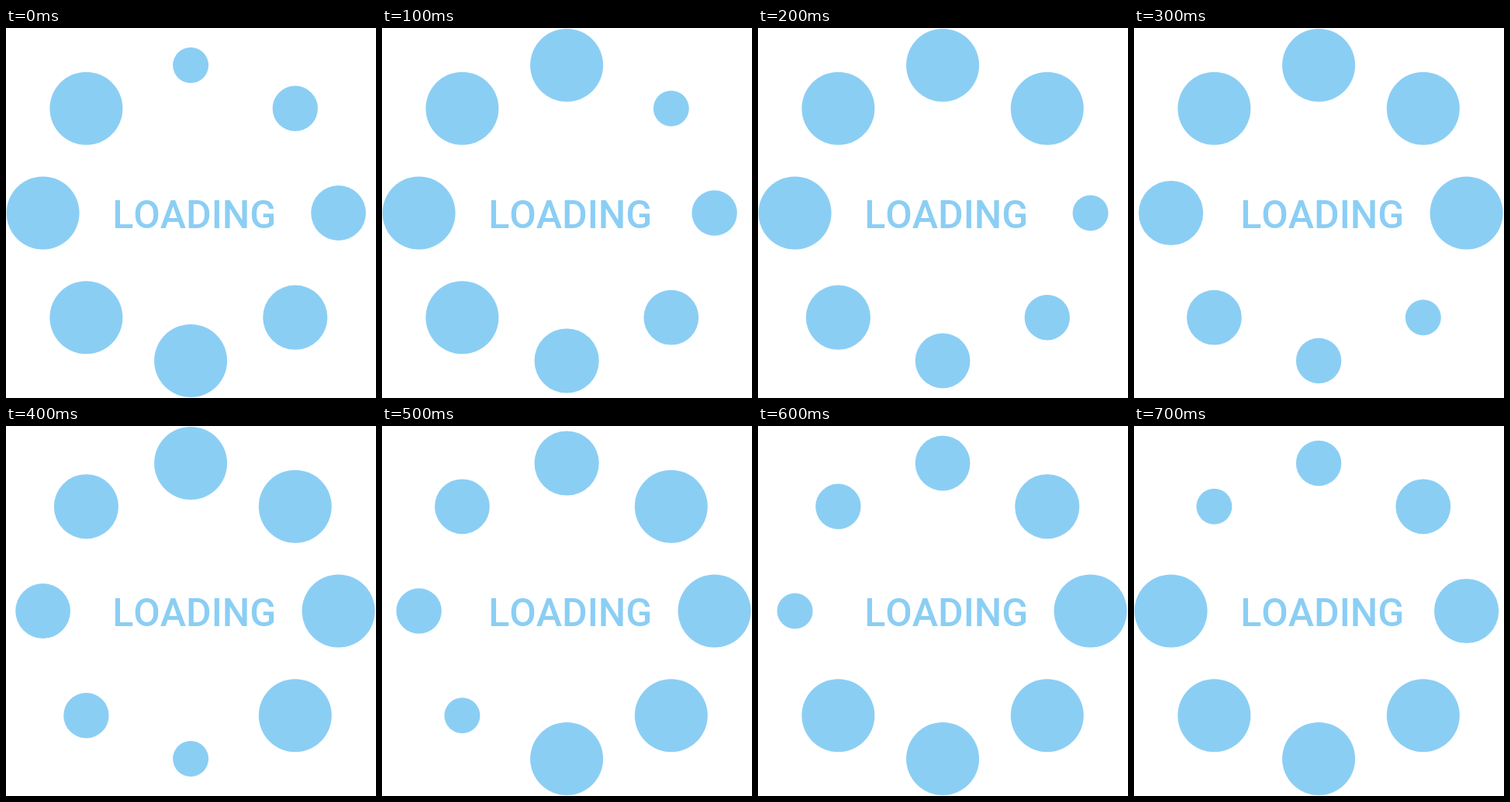
Animation of 477 by 477 pixels, one loop 0.8 s. Source, as an HTML page:

```html
<!DOCTYPE html>
<html lang="en">
<head>
<meta charset="utf-8">
<title>Loading</title>
<style>
  html, body { margin: 0; width: 100%; height: 100%; overflow: hidden; background: #fff; }
  svg { display: block; width: 100%; height: 100%; fill: #8bcef4; }
  text { font: 500 50px Roboto, sans-serif; font-kerning: none; }
</style>
</head>
<body>
<svg viewBox="0 0 477 477">
  <g id="dots"></g>
  <text x="137.2" y="258">LOADING</text>
</svg>
<script>
  const STEP = 100;
  const COUNT = 8;
  const RING = { x: 238.1, y: 238.5, r: 190.5 };
  const DOT = { min: 23, grow: 6.2, max: 47 };
  const group = document.getElementById('dots');

  // Dots sit clockwise on the ring, starting at the top.
  const dots = Array.from({ length: COUNT }, (_, i) => {
    const angle = i / COUNT * 2 * Math.PI;
    const dot = document.createElementNS('http://www.w3.org/2000/svg', 'circle');
    dot.setAttribute('cx', RING.x + RING.r * Math.sin(angle));
    dot.setAttribute('cy', RING.y - RING.r * Math.cos(angle));
    return group.appendChild(dot);
  });

  // The smallest dot moves one place clockwise on every step.
  function draw(time) {
    const lead = Math.floor(time / STEP) % COUNT;
    dots.forEach((dot, i) => {
      const place = (i - lead + COUNT) % COUNT;
      dot.setAttribute('r', Math.min(DOT.min + DOT.grow * place, DOT.max));
    });
  }

  let start;
  function tick(now) {
    start ??= now;
    draw(now - start);
    requestAnimationFrame(tick);
  }

  draw(0);
  requestAnimationFrame(tick);
</script>
</body>
</html>
```
